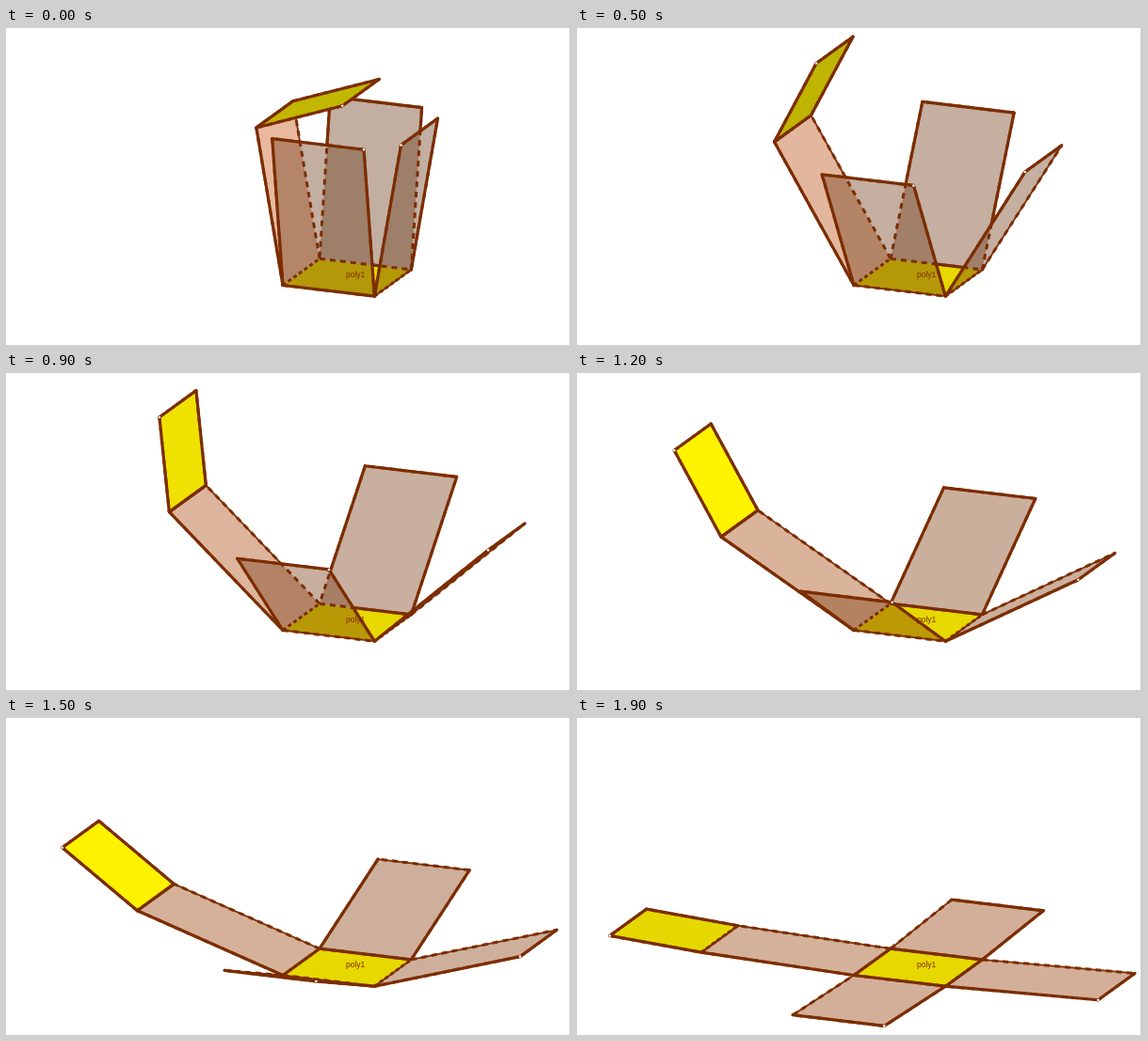
An HTML page with a canvas that plays this animation: 600 px wide and 337 px high, repeating every 2000 ms.

```html
<!DOCTYPE html>
<html>
<head>
<meta charset="utf-8">
<title>Unfolding box</title>
<style>
html, body { margin: 0; width: 100%; height: 100%; overflow: hidden; background: #fff; }
canvas { display: block; }
</style>
</head>
<body>
<canvas id="stage" width="600" height="337"></canvas>
<script>
const ctx = document.getElementById('stage').getContext('2d');
const STEP_MS = 100, STEPS = 20, HEIGHT = 5 / 3, BROWN = '#7c2d00';

// Oblique parallel projection: width, depth and vertical unit vectors on screen.
const origin = [294, 273.5], wide = [97.3, 11.7], deep = [39, -28.3], up = [0, -100];
const add = (p, q) => [p[0] + q[0], p[1] + q[1]];
const scale = (p, k) => [p[0] * k, p[1] * k];
const A = origin, B = add(A, wide), D = add(A, deep), C = add(B, deep);

// A panel hinged on p-q, tilted up from the base plane by an angle.
function panel(p, q, outward, angle, length) {
  const d = add(scale(outward, length * Math.cos(angle)), scale(up, length * Math.sin(angle)));
  return [p, q, add(q, d), add(p, d)];
}

function trace(points) {
  points.forEach((p, i) => i ? ctx.lineTo(...p) : ctx.moveTo(...p));
  ctx.closePath();
}

function fill(points, color) {
  ctx.beginPath();
  trace(points);
  ctx.fillStyle = color;
  ctx.fill();
}

function line(p, q, width, dash = []) {
  ctx.beginPath();
  ctx.moveTo(...p);
  ctx.lineTo(...q);
  ctx.lineWidth = width;
  ctx.setLineDash(dash);
  ctx.stroke();
}

function clipOutside(points) {
  ctx.beginPath();
  ctx.rect(0, 0, 600, 337);
  trace(points);
  ctx.clip('evenodd');
}

// Edges are dashed behind the covering panels; "half" edges are a thin line under dashes.
function outline(points, half, covers) {
  ctx.strokeStyle = BROWN;
  ctx.lineCap = 'butt';
  const edges = points.map((p, i) => [p, points[(i + 1) % 4]]);
  const dashFor = ([p, q]) => Math.hypot(q[0] - p[0], q[1] - p[1]) < 60 ? [4, 3] : [6, 5];
  edges.forEach(e => line(...e, 3, dashFor(e)));
  ctx.save();
  covers.forEach(clipOutside);
  ctx.lineCap = 'round';
  edges.forEach((e, i) => line(...e, half.includes(i) ? 1.8 : 3.2));
  ctx.restore();
}

function dot([x, y]) {
  ctx.beginPath();
  ctx.arc(x, y, 1.3, 0, 7);
  ctx.fillStyle = '#fff';
  ctx.fill();
}

function draw(step) {
  const degrees = 80 - 4.33 * step + 0.011 * step * step;
  const angle = degrees * Math.PI / 180, s = Math.sin(angle);
  const leftward = scale(wide, -1);
  const back = panel(D, C, deep, angle, HEIGHT);
  const left = panel(A, D, leftward, angle, HEIGHT);
  const right = panel(B, C, wide, angle, HEIGHT);
  const front = panel(A, B, scale(deep, -1), angle, HEIGHT);
  const lid = panel(left[3], left[2], leftward, 2 * angle, 1);

  const dim = `rgba(${147 * (1 - 0.3 * s)}, 57, ${24 * s}, 0.4)`;
  const glow = 1 + 0.35 * s * s;
  const bright = `rgba(${147 * glow}, ${60 * glow}, ${18 * s * s}, 0.4)`;
  const light = 0.6 + 0.42 * Math.abs(Math.cos(2 * angle - 0.84));

  ctx.fillStyle = '#fff';
  ctx.fillRect(0, 0, 600, 337);
  ctx.fillStyle = '#c8c8c8';
  ctx.fillRect(598.5, 0, 1.5, 337);

  fill([A, B, C, D], '#e6d800');
  fill(back, dim);
  fill(left, bright);
  fill(right, dim);
  fill(front, dim);

  const halfIf = (test, ...edges) => test ? edges : [];
  const opening = step > 0 && step < 18;
  outline(back, [...halfIf(step > 12 && step < 19, 2), ...halfIf(step > 17, 3)], [right, front]);
  outline(left, [1, ...halfIf(step > 15, 2)], [front]);
  outline(right, [...halfIf(step < 18, 0), ...halfIf(step > 0, 1)], [front]);
  outline(front, [...halfIf(opening, 0), ...halfIf(step > 12, 3)], []);

  fill(lid, `rgb(${255 * light}, ${240 * light}, 0)`);
  outline(lid, halfIf(step > 15, 0), []);
  [right[3], front[2], lid[3]].forEach(dot);

  ctx.fillStyle = '#802a00';
  ctx.font = '8.5px "Liberation Sans", sans-serif';
  ctx.fillText('poly1', 361, 265);
}

function tick() {
  draw(Math.floor(performance.now() / STEP_MS) % STEPS);
  requestAnimationFrame(tick);
}
tick();
</script>
</body>
</html>
```
